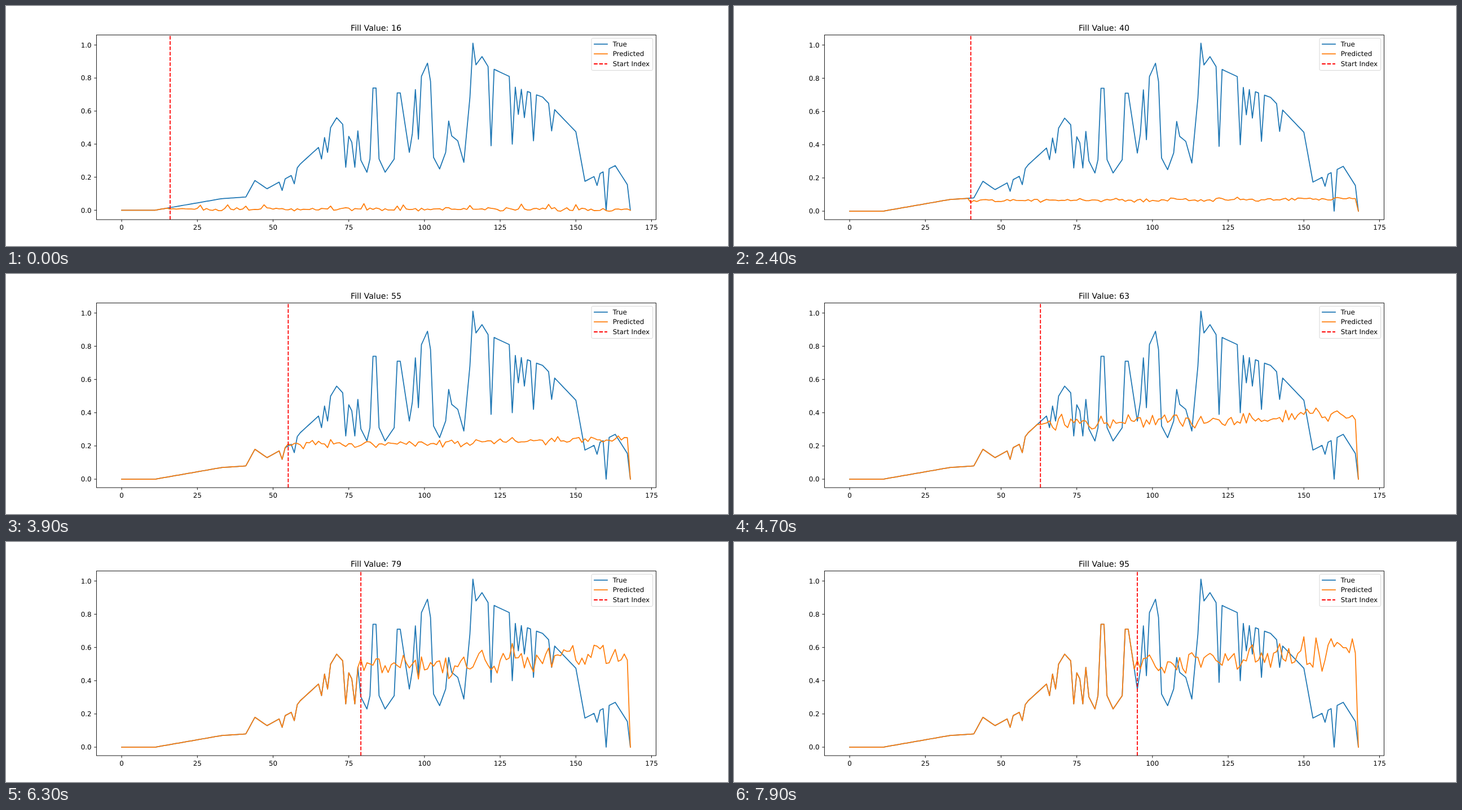
An HTML page that plays this animation: 1280 px wide and 427 px high, repeating every 8000 ms.

```html
<!DOCTYPE html>
<html lang="en">
<head>
<meta charset="utf-8">
<title>Fill value forecast</title>
<style>
  html, body { margin: 0; width: 100%; height: 100%; overflow: hidden; background: #fff; }
  svg { display: block; width: 1280px; height: 427px; font: 11.85px "DejaVu Sans", sans-serif; text-rendering: geometricPrecision; }
  .line { fill: none; stroke-width: 1.77; stroke-linejoin: round; stroke-linecap: square; }
  .true { stroke: #1f77b4; }
  .pred { stroke: #ff7f0e; }
  .start { stroke: #f00; stroke-width: 1.77; stroke-dasharray: 6.58 2.84; }
  .axis { fill: none; stroke: #000; stroke-width: .9; }
  .mid { text-anchor: middle; }
  .end { text-anchor: end; }
  #title { font-size: 14.22px; }
</style>
</head>
<body>
<svg viewBox="0 0 1280 427">
  <polyline id="true" class="line true"/>
  <polyline id="pred" class="line pred"/>
  <line id="start" class="start" y1="380" y2="51.2"/>
  <rect class="axis" x="160.4" y="51.6" width="992" height="328.5"/>
  <g id="xticks"></g>
  <g id="yticks"></g>
  <text id="title" class="mid" x="656" y="44.4"></text>
  <rect x="1038" y="57.4" width="108.6" height="57.2" rx="2.4" fill="#fff" fill-opacity=".8" stroke="#ccc" stroke-opacity=".8"/>
  <path class="line true" d="M1043 67.8h23"/>
  <path class="line pred" d="M1043 85.2h23"/>
  <path class="start" d="M1042.2 103h23.7"/>
  <text x="1075.7" y="72">True</text>
  <text x="1075.7" y="89.4">Predicted</text>
  <text x="1075.7" y="107.1">Start Index</text>
</svg>
<script>
const $ = id => document.getElementById(id);
const FIRST = 16, STEPS = 80, STEP_MS = 100, LAST = 168;
const LEFT = 160, TOP = 51.2, WIDTH = 992, HEIGHT = 328.8;
const MARGIN = 1 / 22, SPAN = 1 / 1.1;

// Outline of the day: [index, value], joined by straight lines.
const outline = [
  [0, 0], [11, 0], [33, .07], [41, .08], [44, .18], [48, .13], [56, .21],
  [59, .28], [65, .38], [71, .56], [73, .52], [81, .23], [82, .31],
  [83, .74], [84, .74], [85, .31], [87, .23], [90, .31], [91, .71], [92, .71],
  [95, .35], [99, .81], [101, .89], [102, .78], [103, .32], [105, .25],
  [109, .45], [111, .42], [113, .29], [115, .68], [116, 1.011], [117, .88],
  [119, .93], [121, .87], [128, .81], [130, .745], [139, .685], [150, .475],
  [153, .175], [163, .27], [167, .155], [168, 0]
];
// Single samples that jump off the outline.
const jumps = {
  53: .12, 57: .16, 66: .31, 68: .35, 74: .26, 77: .26, 78: .48, 97: .73,
  98: .43, 108: .54, 122: .39, 129: .4, 131: .58, 133: .56, 136: .42,
  142: .48, 157: .15, 160: 0
};

function sample(i) {
  if (i in jumps) return jumps[i];
  const k = Math.max(1, outline.findIndex(p => p[0] >= i));
  const [x0, y0] = outline[k - 1], [x1, y1] = outline[k];
  return y0 + (y1 - y0) * (i - x0) / (x1 - x0);
}
const actual = Array.from({ length: LAST + 1 }, (_, i) => sample(i));
const MAX = Math.max(...actual);

function random(seed) {
  return () => {
    seed = seed + 0x6D2B79F5 | 0;
    let t = Math.imul(seed ^ seed >>> 15, 1 | seed);
    t = t + Math.imul(t ^ t >>> 7, 61 | t) ^ t;
    return ((t ^ t >>> 14) >>> 0) / 4294967296;
  };
}

// Known values up to the start index, then a noisy plateau that rises with it.
function forecast(start) {
  const rnd = random(start * 977);
  const level = Math.min(.03, (start - 14) * .002) + .49 / (1 + Math.exp((59 - start) / 7.5));
  const spread = .005 + .15 * level * level;
  return actual.map((v, i) => {
    const noise = (rnd() + rnd() + rnd() - 1.5) * 2 * spread;
    const spike = rnd() > .94 && start < 28 ? .025 : 0;
    if (i < start || i === LAST) return v;
    const p = (i - start) / (LAST - start);
    return Math.max(-.0065, level * (1 + .16 * p * p) + noise + spike);
  });
}

const xAt = i => LEFT + WIDTH * (MARGIN + i / LAST * SPAN);
const points = (values, yAt) =>
  values.map((v, i) => xAt(i).toFixed(2) + ',' + yAt(v).toFixed(2)).join(' ');

let ticks = '';
for (let i = 0; i <= 175; i += 25) {
  const x = xAt(i).toFixed(2);
  ticks += `<path class="axis" d="M${x} 380v4.2"/><text class="mid" x="${x}" y="397.8">${i}</text>`;
}
$('xticks').innerHTML = ticks;

function draw(start) {
  const pred = forecast(start);
  const min = Math.min(0, ...pred);
  const yAt = v => TOP + HEIGHT * (MARGIN + (MAX - v) / (MAX - min) * SPAN);
  $('true').setAttribute('points', points(actual, yAt));
  $('pred').setAttribute('points', points(pred, yAt));
  $('start').setAttribute('x1', xAt(start));
  $('start').setAttribute('x2', xAt(start));
  $('title').textContent = 'Fill Value: ' + start;
  let labels = '';
  for (let k = 0; k <= 5; k++) {
    const y = yAt(k / 5);
    labels += `<path class="axis" d="M160.4 ${y}h-4.2"/><text class="end" x="151.6" y="${y + 4.3}">${(k / 5).toFixed(1)}</text>`;
  }
  $('yticks').innerHTML = labels;
}

let shown = -1;
const began = performance.now();
function tick() {
  const step = Math.floor((performance.now() - began) / STEP_MS) % STEPS;
  if (step !== shown) draw(FIRST + (shown = step));
  requestAnimationFrame(tick);
}
tick();
</script>
</body>
</html>
```
